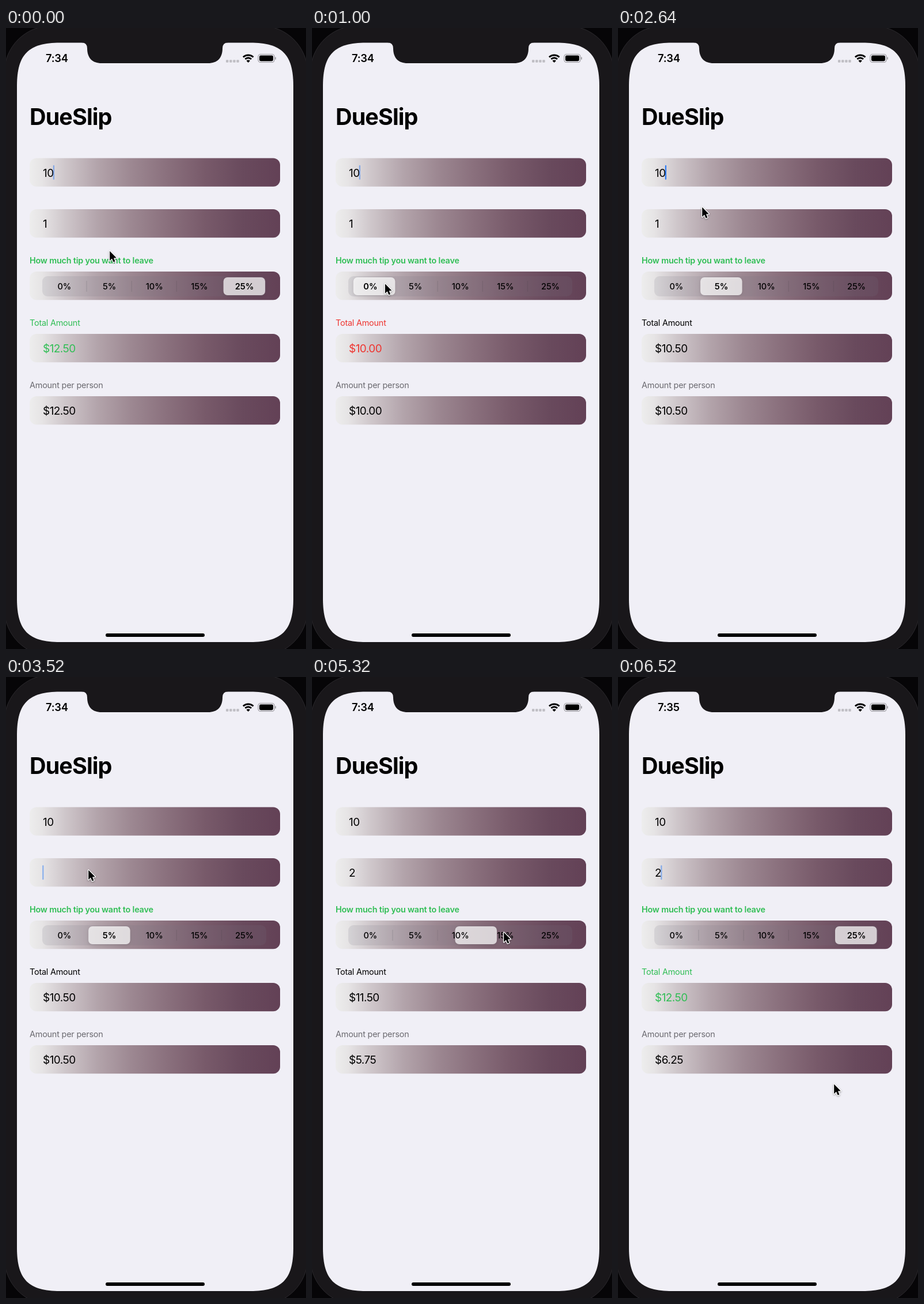
Write an HTML page with a canvas that moves like this. It is 521 px wide and 1076 px high and loops after 6560 ms.

```html
<!DOCTYPE html>
<html lang="en">
<head>
<meta charset="utf-8">
<title>DueSlip</title>
<style>
html, body { margin: 0; width: 100%; height: 100%; overflow: hidden; background: #060507; }
canvas { display: block; width: 521px; height: 1076px; }
</style>
</head>
<body>
<canvas id="stage"></canvas>
<script>
const W = 521, H = 1076, LOOP = 6560, TICK = 40;
const canvas = document.getElementById('stage');
const ctx = canvas.getContext('2d');
const dpr = window.devicePixelRatio || 1;
canvas.width = W * dpr;
canvas.height = H * dpr;

const GREEN = '#30be55', RED = '#ee3530', GREY = '#6b6a70', BLUE = '#2c7cf5';
const TIPS = [0, 5, 10, 15, 25];
const ROWS = { bill: 225.5, people: 314, tip: 422, total: 530, share: 638 };
const STEP = 78.15;

// Timed state changes, in ms
const PICKS = [[480, 0], [1760, 1], [4840, 2], [5200, 3], [5880, 4]];
const FOCUS = 2880, ERASE = 3480, TYPE = 3720, MINUTE = 6360;

// Pointer path: time, x, y
const PATH = [
  [0, 179, 384], [420, 125, 440], [1280, 126, 441], [1680, 186, 450],
  [1800, 186, 450], [2000, 249, 432], [2600, 145, 308], [2680, 145, 308],
  [2840, 142, 332], [3940, 142, 332], [4280, 236, 420], [4680, 256, 441],
  [4900, 257, 441], [5180, 332, 440], [5380, 332, 440], [5800, 408, 445],
  [5960, 408, 445], [6440, 374, 703], [LOOP, 374, 703]
];

const clamp = v => Math.max(0, Math.min(1, v));
const smooth = v => v * v * (3 - 2 * v);
const spring = ms => ms <= 0 ? 0 : 1 - (1 + ms * 0.011) * Math.exp(-ms * 0.011);

function pointerAt(t) {
  const i = Math.max(1, PATH.findIndex(p => p[0] > t));
  const [t0, x0, y0] = PATH[i - 1], [t1, x1, y1] = PATH[i];
  const k = smooth(clamp((t - t0) / (t1 - t0)));
  return [x0 + (x1 - x0) * k, y0 + (y1 - y0) * k];
}

function tipAt(t) {
  let target = 4, pos = 4;
  for (const [at, next] of PICKS) {
    if (t < at) break;
    pos += (next - target) * spring(t - at);
    target = next;
  }
  return { target, pos };
}

function caretAlpha(t) {
  const start = t < FOCUS ? 0 : 520;
  const p = ((t - start) % 1000 + 1000) % 1000;
  if (p < 60) return 0.5 + p / 120;
  if (p < 650) return 1;
  if (p < 720) return (720 - p) / 70;
  return clamp((p - 940) / 120);
}

function box(x, y, w, h, r, fill) {
  ctx.beginPath();
  ctx.roundRect(x, y, w, h, r);
  ctx.fillStyle = fill;
  ctx.fill();
}

function text(str, x, y, size, weight, color, spacing = 0, align = 'left') {
  ctx.font = `${weight} ${size}px Inter, Roboto, sans-serif`;
  ctx.letterSpacing = spacing + 'px';
  ctx.textAlign = align;
  ctx.fillStyle = color;
  ctx.fillText(str, x, y);
}

const label = (str, y, color, weight = 400) => text(str, 41, y, 14.4, weight, color, -0.2);
const value = (str, row, color) => text(str, 64, row + 32.3, 19, 400, color, -0.55);
const money = n => '$' + n.toFixed(2);

function screenShape() {
  const l = 19, r = 499, t = 25.5, b = 1064, L = 75, c = 20;
  ctx.beginPath();
  ctx.moveTo(l, t + L);
  ctx.bezierCurveTo(l, t + c, l + c, t, l + L, t);
  ctx.lineTo(r - L, t);
  ctx.bezierCurveTo(r - c, t, r, t + c, r, t + L);
  ctx.lineTo(r, b - L);
  ctx.bezierCurveTo(r, b - c, r - c, b, r - L, b);
  ctx.lineTo(l + L, b);
  ctx.bezierCurveTo(l + c, b, l, b - c, l, b - L);
  ctx.closePath();
}

function phone() {
  ctx.fillStyle = '#060507';
  ctx.fillRect(0, 0, W, H);
  box(-3, -4, 527, 1092, 82, '#19171a');
  ctx.strokeStyle = '#2b292d';
  ctx.lineWidth = 1;
  ctx.stroke();
  screenShape();
  ctx.fillStyle = '#f0eff6';
  ctx.fill();

  // Notch with flared shoulders
  ctx.beginPath();
  ctx.moveTo(131, 25);
  ctx.quadraticCurveTo(141, 25.5, 141, 35);
  ctx.bezierCurveTo(141, 52, 150, 61, 166, 61);
  ctx.lineTo(351, 61);
  ctx.bezierCurveTo(367, 61, 376, 52, 376, 35);
  ctx.quadraticCurveTo(376, 25.5, 386, 25);
  ctx.closePath();
  ctx.fillStyle = '#19171a';
  ctx.fill();
  box(173, 1049, 172, 6, 3, '#000');
}

function statusBar(t) {
  text(t < MINUTE ? '7:34' : '7:35', 69, 59.3, 18.4, 600, '#000', -0.3);
  for (let i = 0; i < 4; i++) box(382 + i * 6.1, 55.3, 4.4, 4.4, 1, '#bfbec4');

  ctx.strokeStyle = ctx.fillStyle = '#000';
  ctx.lineWidth = 3;
  const a = -Math.PI * 0.75, b = -Math.PI * 0.25;
  for (const r of [7.5, 12.4]) {
    ctx.beginPath();
    ctx.arc(420.7, 59.3, r, a, b);
    ctx.stroke();
  }
  ctx.beginPath();
  ctx.moveTo(420.7, 60);
  ctx.arc(420.7, 60, 4.6, a, b);
  ctx.fill();

  ctx.beginPath();
  ctx.roundRect(438, 45.5, 28, 14, 4);
  ctx.strokeStyle = '#98979c';
  ctx.lineWidth = 1.2;
  ctx.stroke();
  box(440, 47.5, 24, 10, 2.4, '#000');
  box(467.3, 50.2, 1.6, 4.6, 1, '#98979c');
}

const shade = ctx.createLinearGradient(41, 0, 476, 0);
[
  [0, '#ededed'], [0.05, '#e6e4e5'], [0.14, '#cfc7cb'], [0.27, '#b3a4ab'],
  [0.41, '#9c8791'], [0.55, '#8a707d'], [0.7, '#785a6a'], [0.85, '#694a5d'],
  [1, '#634156']
].forEach(s => shade.addColorStop(...s));

function picker(target, pos) {
  box(63, 430, 389, 35, 9, 'rgba(118,118,128,0.15)');
  for (let i = 0; i < 4; i++) {
    const gap = Math.min(Math.abs(target - i - 0.5), Math.abs(pos - i - 0.5));
    const alpha = 0.17 * clamp((gap - 0.6) / 0.4);
    box(140 + i * STEP - 0.6, 438, 1.2, 19, 0.6, `rgba(60,60,67,${alpha})`);
  }
  ctx.save();
  ctx.shadowColor = 'rgba(0,0,0,0.14)';
  ctx.shadowBlur = 7 * dpr;
  ctx.shadowOffsetY = 2 * dpr;
  box(65 + pos * STEP, 432, 72.5, 31, 7, 'rgba(255,255,255,0.73)');
  ctx.restore();
  TIPS.forEach((tip, i) => {
    const weight = i === target && Math.abs(pos - i) < 0.4 ? 600 : 500;
    text(tip + '%', 101.4 + i * STEP, 453, 14.6, weight, '#000', -0.1, 'center');
  });
}

function caret(str, row, t) {
  ctx.font = '400 19px Inter, Roboto, sans-serif';
  ctx.letterSpacing = '-0.55px';
  const x = 63.2 + ctx.measureText(str).width;
  ctx.globalAlpha = caretAlpha(t);
  box(x, row + 12.3, 2.2, 25, 1, BLUE);
  ctx.globalAlpha = 1;
}

function pointer(x, y) {
  const pts = [[0, 0], [0, 16.6], [3.8, 13], [6.4, 19], [9.3, 17.8], [6.8, 11.9], [11.6, 11.6]];
  ctx.save();
  ctx.translate(x + 1.2, y + 2.6);
  ctx.beginPath();
  pts.forEach(p => ctx.lineTo(...p));
  ctx.closePath();
  ctx.lineJoin = 'round';
  ctx.lineWidth = 2.6;
  ctx.strokeStyle = '#fff';
  ctx.shadowColor = 'rgba(0,0,0,0.35)';
  ctx.shadowBlur = 3 * dpr;
  ctx.shadowOffsetY = dpr;
  ctx.stroke();
  ctx.shadowColor = 'transparent';
  ctx.fillStyle = '#000';
  ctx.fill();
  ctx.restore();
}

function draw(t) {
  ctx.setTransform(dpr, 0, 0, dpr, 0, 0);
  phone();
  statusBar(t);
  text('DueSlip', 41, 168, 39.5, 700, '#000', -0.9);
  for (const y of Object.values(ROWS)) box(41, y, 435, 49.2, 12, shade);

  const { target, pos } = tipAt(t);
  const people = t < ERASE ? '1' : t < TYPE ? '' : '2';
  const total = 10 * (1 + TIPS[target] / 100);
  const color = target === 0 ? RED : target === 4 ? GREEN : '#000';

  value('10', ROWS.bill, '#000');
  value(people, ROWS.people, '#000');
  if (t < FOCUS) caret('10', ROWS.bill, t);
  else caret(people, ROWS.people, t);

  label('How much tip you want to leave', 407.5, GREEN, 600);
  picker(target, pos);
  label('Total Amount', 515.6, color);
  value(money(total), ROWS.total, color);
  label('Amount per person', 623.6, GREY);
  value(money(total / (people || 1)), ROWS.share, '#000');
  pointer(...pointerAt(t));
}

const start = performance.now();
function frame() {
  const t = (performance.now() - start) % LOOP;
  draw(Math.floor(t / TICK) * TICK);
  requestAnimationFrame(frame);
}
frame();
</script>
</body>
</html>
```
